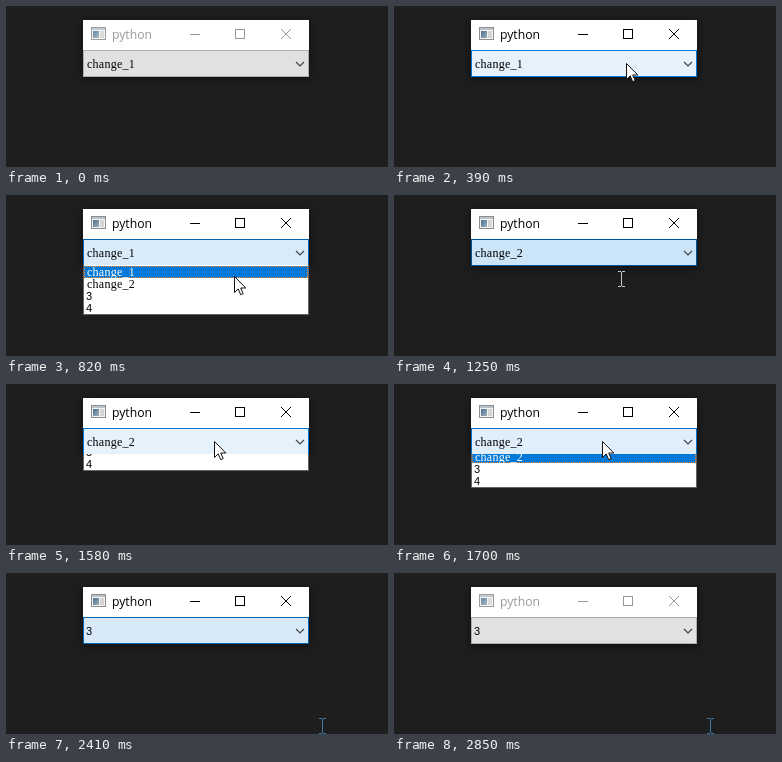
An HTML page that plays this animation: 382x161 px, repeating every 2970 ms.

```html
<!DOCTYPE html>
<html lang="en">
<head>
<meta charset="utf-8">
<title>Combo box</title>
<style>
  html, body { margin: 0; width: 100%; height: 100%; overflow: hidden; background: #1e1e1e; }
  svg { display: block; }
  rect, .crisp { shape-rendering: crispEdges; }
  .window { filter: drop-shadow(0 2px 4px rgba(0, 0, 0, .5)); }
  .title { font: 12.2px "Open Sans", sans-serif; }
  .word { font: 12px "Liberation Serif", serif; letter-spacing: .25px; }
  .digit { font: 11px "Liberation Sans", sans-serif; }
</style>
</head>
<body>
<svg width="382" height="161" viewBox="0 0 382 161">
  <defs>
    <linearGradient id="pane" x2="1" y2="1">
      <stop stop-color="#4c6f94"/><stop offset="1" stop-color="#9db0b8"/>
    </linearGradient>
    <clipPath id="roll"><rect id="rollBox" x="77" y="70" width="226" height="0"/></clipPath>
  </defs>

  <g class="window">
    <rect x="77" y="14" width="226" height="57" fill="#fff"/>
  </g>
  <g id="icon">
    <rect x="85.5" y="21.5" width="14" height="12" fill="#f4f4f4" stroke="#8c8c8c"/>
    <rect x="86" y="22" width="13" height="2" fill="#b9c3cc"/>
    <rect x="87" y="25" width="6" height="7" fill="url(#pane)"/>
    <rect x="94" y="25" width="4" height="7" fill="#d5d5d5"/>
  </g>
  <text id="title" class="title" x="106" y="33">python</text>
  <g id="buttons" fill="none">
    <path class="crisp" d="M184 28.5h10M229.5 23.5h9v9h-9z"/>
    <path d="M275 23l10 10M285 23l-10 10"/>
  </g>

  <rect id="combo" x="77.5" y="44.5" width="225" height="26"/>
  <text id="value" y="62"></text>
  <path d="M290 56l4 4 4-4" fill="none" stroke="#444" stroke-width="1.2"/>

  <g clip-path="url(#roll)">
    <g id="popup">
      <rect x="77.5" y="70.5" width="225" height="49" fill="#fff" stroke="#646464"/>
      <rect x="78" y="70" width="224" height="1" fill="#fff"/>
      <g id="mark">
        <rect x="78" y="71" width="224" height="12" fill="#0078d7"/>
        <rect x="78.5" y="71.5" width="223" height="11" fill="none" stroke="#ff8728" stroke-dasharray="1 1"/>
      </g>
      <g id="rows"></g>
    </g>
  </g>

  <path id="arrow" d="M.5 .5v16l3.7-3.6 2.5 5.8 2.5-1.1-2.5-5.6h5.1z" fill="#fff" stroke="#111"/>
  <path id="beam" class="crisp" d="M-3 -7.5h2.5M1 -7.5h2.5M.5 -7v14M-3 7.5h2.5M1 7.5h2.5" fill="none"/>
</svg>
<script>
const LOOP = 2970, TOP = 71, ROW = 12, FULL = 50;
const PICK_2 = 1250, PICK_3 = 2220, ACTIVE = 200, INACTIVE = 2850;
const ITEMS = ["change_1", "change_2", "3", "4"];

// Screen updates come in bursts: start, end, count.
const bursts = [[60, 560, 8], [630, 1000, 7], [1250, 1770, 9], [1840, 2350, 9], [2410, 2600, 4]];
const ticks = [0, ...bursts.flatMap(([a, b, n]) =>
  Array.from({ length: n }, (_, i) => a + (b - a) * i / (n - 1))), INACTIVE];

const pointer = [
  [60, 240, 92], [130, 236, 66], [200, 232, 57], [560, 232, 57], [815, 228, 81],
  [1000, 227, 83.5], [1250, 227, 84], [1315, 225, 78], [1445, 208, 57], [1770, 208, 57],
  [2030, 195, 100], [2095, 194, 102], [2160, 194, 102], [2222, 198, 103],
  [2286, 211, 105], [2350, 316, 153]
];
// 0 normal, 1 hover, 2 pressed
const heat = [
  [130, 0], [330, 1], [420, 1], [560, 1.5], [1249, 1.5], [1250, 2], [1510, 1],
  [1580, 1], [1770, 1.8], [2219, 1.8], [2220, 2], [2350, 2], [2600, 0]
];
const roll = [
  [360, 0], [560, FULL], [1249, FULL], [1250, 0], [1510, 0], [1575, 17],
  [1705, FULL], [2219, FULL], [2220, 0]
];
const FILLS = [[225, 225, 225], [229, 241, 251], [204, 228, 247]];
const EDGES = [[173, 173, 173], [0, 120, 215], [0, 84, 153]];

const el = id => document.getElementById(id);
const set = (node, attrs) => {
  for (const key in attrs) node.setAttribute(key, attrs[key]);
};
const textClass = s => s.length > 1 ? "word" : "digit";

function sample(track, t) {
  const i = track.findIndex(p => p[0] > t);
  if (i < 0) return track[track.length - 1].slice(1);
  if (i === 0) return track[0].slice(1);
  const a = track[i - 1], b = track[i], k = (t - a[0]) / (b[0] - a[0]);
  return a.slice(1).map((v, j) => v + (b[j + 1] - v) * k);
}

function shade(colors, level) {
  const i = Math.min(1, Math.floor(level)), k = level - i;
  return `rgb(${colors[i].map((v, j) => Math.round(v + (colors[i + 1][j] - v) * k))})`;
}

const rows = ITEMS.map((label, i) => {
  const row = document.createElementNS("http://www.w3.org/2000/svg", "text");
  set(row, { x: label.length > 1 ? 81 : 80, y: TOP + ROW * i + 10, class: textClass(label) });
  row.textContent = label;
  el("rows").append(row);
  return row;
});

function render(time) {
  const t = ticks.filter(s => s <= time).pop();
  const [x, y] = sample(pointer, t).map(Math.round);
  const [level] = sample(heat, t);
  const height = Math.round(sample(roll, t)[0]);
  const chosen = t < PICK_2 ? 0 : t < PICK_3 ? 1 : 2;
  const active = t >= ACTIVE && t < INACTIVE;

  set(el("title"), { fill: active ? "#000" : "#999" });
  set(el("buttons"), { stroke: active ? "#000" : "#999" });
  set(el("icon"), { opacity: active ? 1 : .85 });
  set(el("combo"), { fill: shade(FILLS, level), stroke: shade(EDGES, level) });
  set(el("value"), { x: chosen < 2 ? 81 : 80, class: textClass(ITEMS[chosen]) });
  el("value").textContent = ITEMS[chosen];

  const hovered = Math.max(chosen, Math.floor((y - TOP) / ROW));
  set(el("rollBox"), { height });
  set(el("popup"), { transform: `translate(0 ${height - FULL})` });
  set(el("mark"), { transform: `translate(0 ${hovered * ROW})` });
  rows.forEach((row, i) => set(row, { fill: i === hovered ? "#fff" : "#000" }));

  const shown = t >= 60, overText = y > TOP && !height;
  const transform = `translate(${x} ${y})`;
  set(el("arrow"), { transform, visibility: shown && !overText ? "visible" : "hidden" });
  set(el("beam"), {
    transform, visibility: shown && overText ? "visible" : "hidden",
    stroke: x > 303 ? "#3f7ba6" : "#c8c8c8"
  });
}

function frame() {
  render(performance.now() % LOOP);
  requestAnimationFrame(frame);
}
frame();
</script>
</body>
</html>
```
